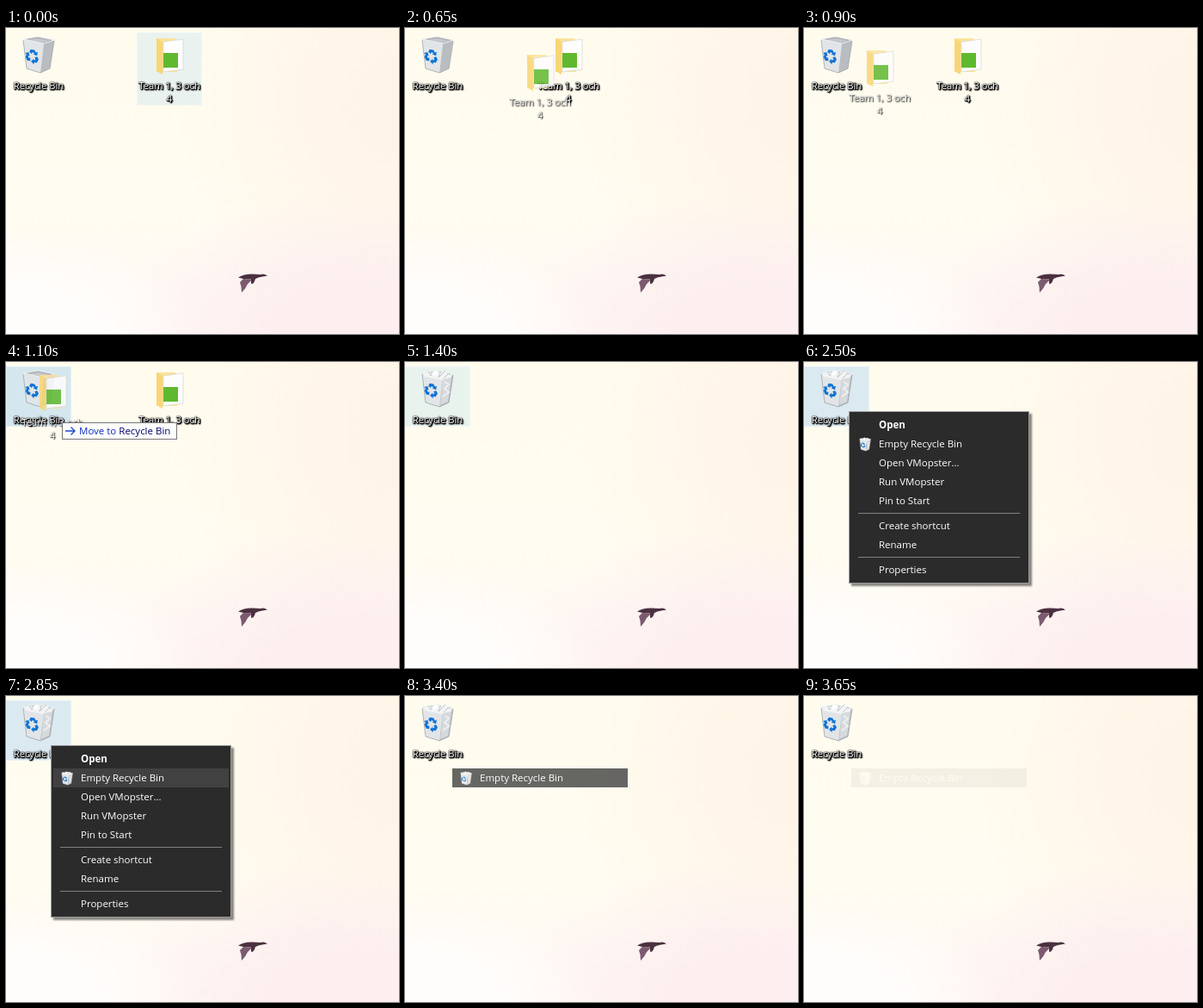
Animation, 457 px wide and 355 px high, one loop 4.6 s. Source, as an HTML page:

```html
<!DOCTYPE html>
<html lang="en">
<head>
<meta charset="utf-8">
<title>Desktop</title>
<style>
  html, body { margin: 0; width: 100%; height: 100%; overflow: hidden; }
  body { font: 11.5px/22px "Open Sans", "Noto Sans", sans-serif; }
  #stage {
    position: relative; width: 457px; height: 355px; overflow: hidden;
    background:
      radial-gradient(ellipse 230px 120px at 0 100%, #fffdfb 45%, #fffdfb00),
      radial-gradient(ellipse 300px 165px at 90% 100%, #fdeff0 35%, #fdeff000),
      radial-gradient(ellipse 260px 300px at 100% 25%, #fff4e7 20%, #fff4e700),
      linear-gradient(#fffcee, #fffcf1 60%, #fef7f5);
  }
  #stage > * { position: absolute; }
  svg { position: absolute; left: 0; top: 0; overflow: visible; }
  .cell { top: 5px; width: 76px; }
  .cell b {
    position: absolute; left: 0; right: 0; top: 54px;
    font-weight: 400; font-size: 11.2px; line-height: 15px;
    text-align: center; white-space: pre; color: #fff;
    text-shadow: 0 0 1px #000, 0 1px 1px #000, 1px 1px 1px #000, 1px 1px 1px #000,
      1px 1px 2px #000, 1px 1px 2px #000, 0 0 2px #000;
  }
  #bin { left: 0; height: 70px; }
  #folder, #ghost { left: 152px; height: 85px; }
  #ghost svg { opacity: .85; }
  #ghost b { text-shadow: 0 0 1px #000a, 1px 1px 1px #000a, 1px 1px 2px #0006; }
  .tip {
    box-sizing: border-box; height: 20px; border: 1px solid #767676;
    background: #fff; line-height: 17px; white-space: nowrap;
  }
  #move { left: 65px; top: 70px; width: 134px; padding-left: 19px; color: #0f2cc0; }
  #move i { font-style: normal; color: #000068; }
  #info { right: 117px; top: 77px; padding: 0 5px; color: #575757; }
  #menu {
    box-sizing: border-box; left: 52px; top: 57px; width: 210px; height: 200px;
    padding: 4px 2px; border: 1px solid #9c9c9c; background: #2b2b2b;
    box-shadow: 3px 3px 2px #0007;
  }
  .row { position: relative; height: 22px; padding-left: 32px; color: #fff; white-space: nowrap; }
  .row.on { background: #414141; }
  .row:first-child { font-weight: 700; }
  hr { height: 1px; margin: 3px 8px; border: 0; background: #808080; }
  #fade { left: 55px; top: 84px; width: 172px; }
</style>
</head>
<body>
<div id="stage">
  <svg width="457" height="355">
    <defs>
      <path id="arrow" d="M-3.400 -4.600 L-1.800 -7.600 H2.600 L4.400 -5 L6.400 -6 L5.600 -1.600 L1.200 -2.600 L2.600 -3.600 L1 -4.600 H.2 L-.6 -2.800Z"/>
      <g id="loop" fill="#0f74d4">
        <use href="#arrow"/>
        <use href="#arrow" transform="rotate(120)"/>
        <use href="#arrow" transform="rotate(240)"/>
      </g>
      <g id="pail">
        <path d="M20 13 L37 10 L56 14 L44 18Z" fill="#a9adb1"/>
        <path d="M24 14 L37 12 L51 14.500 L43 17Z" fill="#c6c9cc"/>
        <path d="M20 13 L44 18 L40 52 L24 47Z" fill="#e2e5e8"/>
        <path d="M44 18 L56 14 L51 47 L40 52Z" fill="#b9bdc1"/>
        <path d="M20 13 L37 10 L56 14 L44 18Z" fill="none" stroke="#eef0f2"/>
        <path d="M20 14 L24 47 L40 52 L51 47 L56 15" fill="none" stroke="#9ea2a6" stroke-width=".8"/>
        <use href="#loop" transform="matrix(1 .15 0 1.05 30.500 33)"/>
      </g>
      <g id="paper">
        <path d="M21 14 L27 11 L31 13 L36 9 L41 12 L47 10 L50 14 L55 15 L53 19 L43 21 L23 17Z" fill="#f1f3f4"/>
        <path d="M27 11 L30 16 L36 9 M41 12 L39 18 L47 10 M50 14 L45 19" fill="none" stroke="#c0c4c8"/>
        <path d="M31 13 L36 9 L38 14 L33 16Z" fill="#fff"/>
        <path d="M44 20 L54 18 L50 46 L41 50Z" fill="#d7dadd"/>
        <path d="M46 23 L51 26 L46 31 L51 35 L44 40" fill="none" stroke="#eceef0" stroke-width="2"/>
      </g>
      <g id="docs">
        <path d="M23 7 H44 L47 9 V46 H23Z" fill="#fbe39a"/>
        <path d="M31 11 L54 8 V43 L31 46Z" fill="#fdfdfd" stroke="#d4d4cf" stroke-width=".7"/>
        <rect x="31" y="24" width="17" height="17" fill="#5fb92f"/>
        <path d="M23 7 L30 11 V49 L23 45Z" fill="#f8d675"/>
      </g>
    </defs>
    <path d="M276 291 L272 295 L273.500 300 L274 307 Q279 302 281 297 L286 292Z" fill="#7c5a70"/>
    <path d="M270 289.500 Q277 285 287 285.500 L296 286 Q300 284.500 304 287.500 L298 288.500 Q293 289 290 291 Q288 298 285 296.500 L285 291.500 Q277 292 270 289.500Z" fill="#4b3140"/>
  </svg>

  <div id="bin" class="cell">
    <svg width="76" height="70"><g transform="translate(0 -5)"><use href="#pail"/><use id="full" href="#paper"/></g></svg>
    <b>Recycle Bin</b>
  </div>
  <div id="folder" class="cell">
    <svg width="76" height="85"><use href="#docs"/></svg>
    <b>Team 1, 3 och
4</b>
  </div>

  <div id="move" class="tip">
    <svg width="20" height="18"><path d="M3 9 H14 M9.500 4.500 L14 9 L9.500 13.500" fill="none" stroke="#1c45cc" stroke-width="1.300"/></svg>
    Move to <i>Recycle Bin</i>
  </div>
  <div id="info" class="tip">Contains the files and folders that you have deleted.</div>

  <div id="menu">
    <div class="row">Open</div>
    <div class="row" id="empty"><svg width="32" height="22"><g transform="translate(2.500 .500) scale(.36)"><use href="#pail"/><use href="#paper"/></g></svg>Empty Recycle Bin</div>
    <div class="row">Open VMopster...</div>
    <div class="row">Run VMopster</div>
    <div class="row">Pin to Start</div>
    <hr>
    <div class="row">Create shortcut</div>
    <div class="row">Rename</div>
    <hr>
    <div class="row">Properties</div>
  </div>
</div>
<script>
  const LOOP = 4600, STEP = 50;
  const $ = id => document.getElementById(id);
  const stage = $('stage'), rows = document.querySelectorAll('.row');

  const ghost = $('folder').cloneNode(true);
  ghost.id = 'ghost';
  stage.insertBefore(ghost, $('move'));

  const fade = $('empty').cloneNode(true);
  fade.id = 'fade';
  fade.classList.add('on');
  stage.append(fade);

  // Each table holds [start time, value]; a value lasts until the next entry.
  const binTint = [[0, ''], [1000, '#d5e7ee'], [1400, '#e9f3ee'], [2150, '#c9e0ec'], [2500, '#dbeaf1'], [3400, '']];
  const folderTint = [[0, '#e9f2ee'], [450, '#d5e7ee'], [500, '']];
  const infoAlpha = [[0, 0], [2050, .5], [2100, 1], [2150, 0]];
  const hotRow = [[0, -1], [2650, 0], [2850, 1]];
  const fadeAlpha = [[0, 0], [3400, .8], [3450, .62], [3500, .45], [3550, .3], [3600, .16], [3650, .055]];
  const drag = [[500, -4, 4], [550, -10, 9], [600, -20, 14], [650, -33, 19], [700, -48, 19],
    [800, -78, 18], [900, -102, 14], [1000, -120, 9], [1100, -136, 3], [1200, -138, 2], [1250, -138, 2]];

  const last = (table, t) => table.filter(row => row[0] <= t).pop();
  const at = (table, t) => last(table, t)[1];
  const show = (el, on) => { el.style.visibility = on ? 'visible' : 'hidden'; };
  const shift = (el, x, y) => { el.style.transform = `translate(${x}px, ${y}px)`; };

  function tint(el, color) {
    el.style.background = color;
    el.style.boxShadow = color && 'inset 0 0 0 1px #fff5';
  }

  function dragPos(t) {
    const a = last(drag, t), b = drag.find(row => row[0] > t) || a;
    const k = a === b ? 0 : (t - a[0]) / (b[0] - a[0]);
    return [1, 2].map(i => Math.round(a[i] + (b[i] - a[i]) * k));
  }

  function draw(time) {
    const t = Math.floor(time % LOOP / STEP) * STEP;
    const dragging = t >= 500 && t < 1250;

    tint($('bin'), at(binTint, t));
    tint($('folder'), at(folderTint, t));
    show($('folder'), t < 1300);
    show($('full'), t >= 1300);

    show(ghost, dragging);
    show($('move'), dragging && t >= 1000);
    if (dragging) {
      const [x, y] = dragPos(t);
      shift(ghost, x, y);
      shift($('move'), x + 136, y - 3);
    }

    $('info').style.opacity = at(infoAlpha, t);
    show($('menu'), t >= 2500 && t < 3400);
    rows.forEach((row, i) => row.classList.toggle('on', i === at(hotRow, t)));
    fade.style.opacity = at(fadeAlpha, t);
  }

  const start = performance.now();
  function tick() {
    draw(performance.now() - start);
    requestAnimationFrame(tick);
  }
  tick();
</script>
</body>
</html>
```
